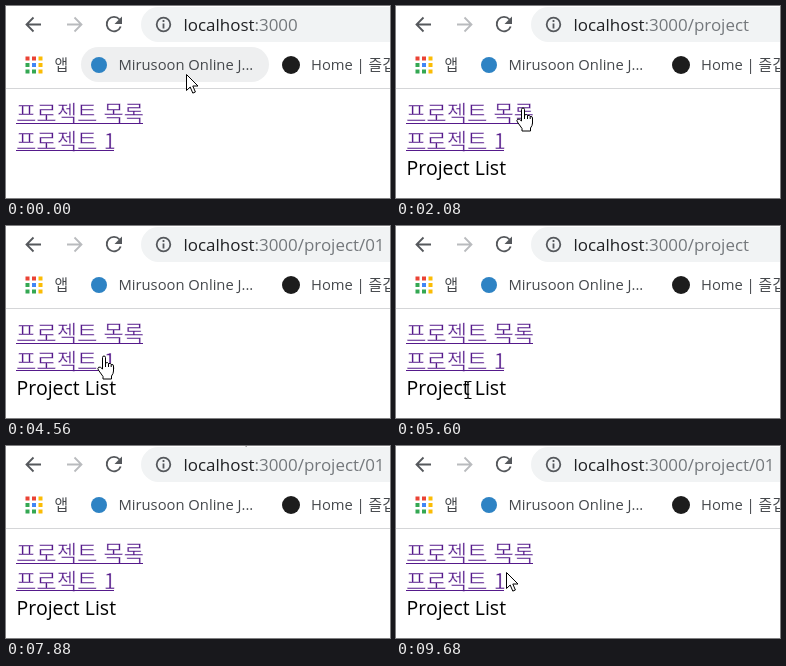
Write an HTML page that moves like this. It is 384 by 192 pixels and loops after 10 s.

```html
<!DOCTYPE html>
<html lang="ko">
<head>
<meta charset="utf-8">
<style>
  html, body { margin: 0; width: 100%; height: 100%; overflow: hidden; background: #fff; }
  svg { display: block; width: 384px; height: 192px; }
  text { font-family: "Open Sans", "Noto Sans CJK KR", "Noto Sans CJK", sans-serif; white-space: pre; }
  .url { font-size: 16.95px; fill: #202124; }
  .url tspan { fill: #74787c; }
  .mark { font-size: 14.75px; fill: #45484c; }
  .ko { font-family: "Noto Sans CJK KR", "Noto Sans CJK", sans-serif; }
  .link { font-size: 22.1px; font-weight: 300; fill: #551a8b; stroke: #fff; stroke-width: .45; }
  .icon { fill: none; stroke: #55585c; stroke-width: 1.8; }
  .pointer { fill: #fff; stroke: #000; stroke-linejoin: round; }
</style>
</head>
<body>
<svg viewBox="0 0 384 192">
  <!-- toolbar -->
  <path class="icon" d="M35 18.5H21M27.5 11.5l-7 7 7 7"/>
  <path class="icon" style="stroke:#b9bbbe" d="M61 18.5h14M68.500 11.5l7 7-7 7"/>
  <path class="icon" d="M113.500 13.500A7.200 7.200 0 1 0 114.700 20.500"/>
  <path fill="#55585c" d="M116 10.500v7.500h-7.500z"/>
  <path fill="#f1f3f4" d="M384 1H152.500a17.500 17.500 0 0 0 0 35H384z"/>
  <circle class="icon" cx="157.500" cy="18.500" r="6.800"/>
  <path class="icon" d="M157.500 17.500v5M157.500 14v1.900"/>
  <text class="url" x="177.500" y="25">localhost<tspan id="path"></tspan></text>

  <!-- bookmarks -->
  <rect id="hover" x="75" y="41" width="188" height="35" rx="17.500" fill="#eeeff0"/>
  <g id="apps"></g>
  <text class="mark ko" x="48.500" y="64">앱</text>
  <circle cx="93" cy="59" r="8" fill="#2e83c4"/>
  <text class="mark" x="112.500" y="64">Mirusoon Online J...</text>
  <circle cx="285" cy="59" r="9" fill="#1c1c1c"/>
  <text class="mark" x="305" y="64">Home | 즐겁</text>
  <path d="M0 82.500H384" stroke="#d5d6d8"/>

  <!-- page -->
  <text class="link ko" x="10" y="114.800">프로젝트 목록</text>
  <text class="link ko" x="10" y="142.600">프로젝트 1</text>
  <path d="M10 117.500H137M10 144.500H108" stroke="#551a8b" stroke-width="1.200"/>
  <text id="list" x="10.600" y="169" font-size="19.500">Project List</text>

  <g id="cursor">
    <path id="arrow" class="pointer" d="M.5.5V16.500l3.700-3.500 2.600 6.100 2.600-1.100-2.600-6h5.200z"/>
    <path id="hand" class="pointer" d="M-1.500 13V1.500q0-1.500 1.500-1.500t1.500 1.500V7q2.500-1.300 3 .6 2.300-.9 2.700.9 2.300-.5 2.300 1.500v5q0 2.500-2 5v3H-1v-2.500L-5.600 14q-1.200-2 .3-2.800T-1.500 13M1.500 7v4M4.500 7.600V11M7.200 8.500V11"/>
    <path id="beam" fill="none" stroke="#000" stroke-width="1.200" d="M-3.500-8.500H-1L0-7.500 1-8.500H3.500M-3.500 8.500H-1L0 7.500 1 8.500H3.500M0-7.500V7.500"/>
  </g>
</svg>
<script>
const LOOP = 10000, STEP = 40;
const $ = id => document.getElementById(id);

// start, end, x, y, sideways bow as a share of the distance
const home = [180, 68];
const moves = [
  [40, 800, 127, 102],
  [2080, 2440, 51, 158],
  [2760, 3000, 86, 164],
  [3000, 3520, 0, 148, -.3],
  [3520, 3760, 89, 162],
  [3800, 3920, 105, 152],
  [4080, 4400, 98, 130],
  [4920, 5240, 90, 104],
  [5240, 5880, 60, 205],
  [5920, 6500, 400, 205],
  [6500, 7080, 400, 84],
  [7080, 7720, 233, -19, -.35],
  [7880, 8880, 4, 178],
  [8920, 9680, 110, 126]
];
const visits = [
  [0, ":3000"], [1680, ":3000/project"], [4480, ":3000/project/01"],
  [5240, ":3000/project"], [6120, ":3000/project/01"]
];

const inside = (x, y, left, top, right, bottom) =>
  x >= left && x < right && y >= top && y < bottom;
const show = (id, on) => $(id).setAttribute("visibility", on ? "visible" : "hidden");

function pointerAt(t) {
  let [x, y] = home;
  for (const [start, end, toX, toY, bow = 0] of moves) {
    if (t < start) break;
    const p = Math.min(1, (t - start) / (end - start));
    const e = p * p * (3 - 2 * p), side = 4 * e * (1 - e) * bow;
    const dx = toX - x, dy = toY - y;
    x += dx * e - dy * side;
    y += dy * e + dx * side;
  }
  return [Math.round(x), Math.round(y)];
}

function shapeAt(x, y, listed) {
  if (inside(x, y, 10, 94, 137, 120) || inside(x, y, 10, 122, 108, 148)) return "hand";
  return listed && inside(x, y, 10, 149, 110, 176) ? "beam" : "arrow";
}

function draw(now) {
  const t = Math.floor(now % LOOP / STEP) * STEP;
  const [x, y] = pointerAt(t);
  const path = visits.filter(v => v[0] <= t).pop()[1];
  const listed = path.includes("project");
  const shape = shapeAt(x, y, listed);
  $("path").textContent = path;
  show("list", listed);
  show("hover", inside(x, y, 75, 41, 263, 76));
  for (const id of ["arrow", "hand", "beam"]) show(id, id === shape);
  $("cursor").setAttribute("transform", `translate(${x} ${y})`);
}

const [red, yellow, green, blue] = ["#ea4335", "#fbbc05", "#34a853", "#4285f4"];
[red, red, yellow, green, blue, yellow, green, green, yellow].forEach((fill, i) => {
  const dot = document.createElementNS("http://www.w3.org/2000/svg", "rect");
  const look = { x: 19.5 + i % 3 * 6.5, y: 50.5 + Math.floor(i / 3) * 6.5, width: 4, height: 4, fill };
  for (const key in look) dot.setAttribute(key, look[key]);
  $("apps").append(dot);
});

const start = performance.now();
function tick() {
  draw(performance.now() - start);
  requestAnimationFrame(tick);
}
tick();
</script>
</body>
</html>
```
